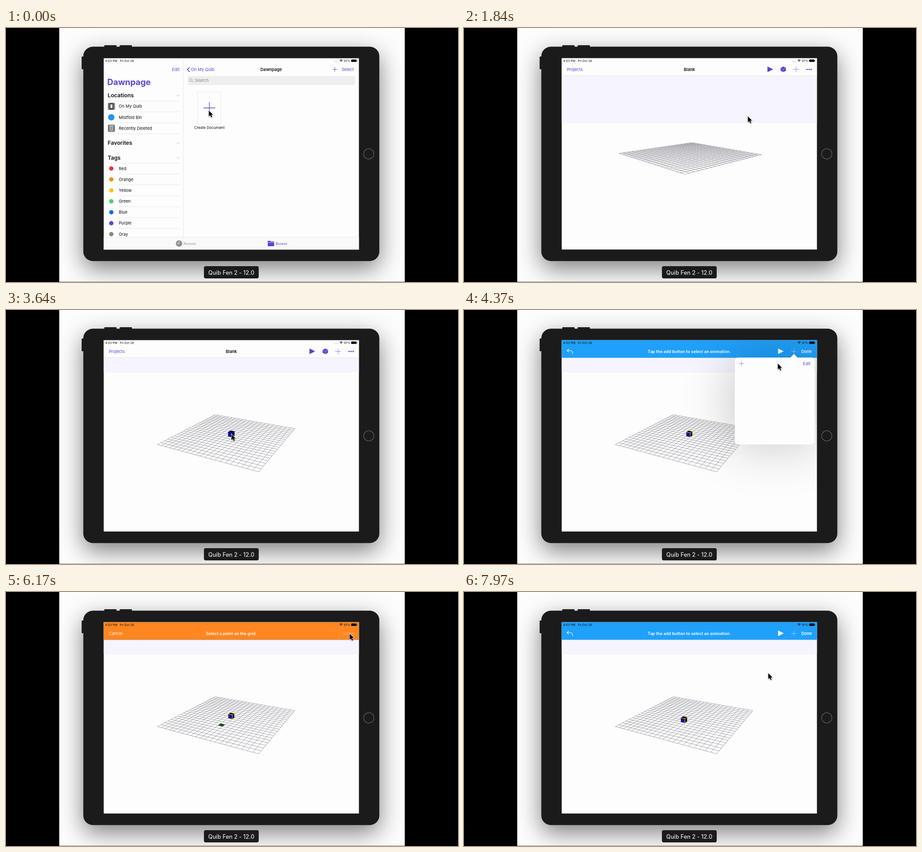
An HTML page with a canvas for the animation above (8000 ms loop, 998 by 561 pixels).

```html
<!DOCTYPE html>
<html lang="en">
<head>
<meta charset="utf-8">
<title>Tablet scene editor</title>
<style>
  html, body { margin: 0; width: 100%; height: 100%; overflow: hidden; background: #000; }
  canvas { display: block; }
</style>
</head>
<body>
<canvas id="stage" width="998" height="561"></canvas>
<script>
const ctx = document.getElementById('stage').getContext('2d');
const LOOP = 8000;
const PURPLE = '#5a45d2', WHITE = '#fdfdfd', BLUE = '#1fa0fa', ORANGE = '#ff8620';
const SCREEN = { x: 215.5, y: 66.5, w: 564, h: 423 };
const BAR_BOTTOM = 105.5;

// Each key: [time, values...], eased between neighbours.
const CURSOR = [
  [0, 447, 181], [650, 447, 181], [1500, 630, 193], [1840, 626, 194], [2400, 532, 209],
  [2560, 556, 206], [2960, 704, 92], [3080, 704, 92], [3520, 497, 273], [3760, 497, 273],
  [4100, 729, 92], [4200, 729, 92], [4370, 692, 117], [4530, 613, 118], [4950, 613, 118],
  [5500, 475, 293], [5680, 475, 293], [6120, 758, 91], [6450, 758, 91], [7000, 699, 92],
  [7500, 699, 92], [7970, 671, 178]
];
// Yaw and pitch in degrees.
const CAMERA = [[1680, 0, 10.5], [1840, -2.6, 11.8], [2400, 22.9, 23.4], [2560, 16.6, 23]];
// An odd number of cells, so that one cell is centred on the origin.
const GRID_HALF = 10.5;
const MOVE_TARGET = 4;

const clamp = v => Math.max(0, Math.min(1, v));
const smooth = v => v * v * (3 - 2 * v);
const ramp = (t, from, to) => smooth(clamp((t - from) / (to - from)));
const fadeInOut = (t, a, b, len = 120) => ramp(t, a, a + len) * (1 - ramp(t, b, b + len));

function track(keys, t) {
  let i = 0;
  while (i < keys.length - 2 && t >= keys[i + 1][0]) i++;
  const [a, b] = [keys[i], keys[i + 1]];
  const k = ramp(t, a[0], b[0]);
  return a.slice(1).map((v, n) => v + (b[n + 1] - v) * k);
}

function text(str, x, y, size, color = '#111', weight = 400, align = 'left') {
  ctx.font = `${weight} ${size}px Inter, "Liberation Sans", sans-serif`;
  ctx.textAlign = align;
  ctx.fillStyle = color;
  ctx.fillText(str, x, y + size * 0.36);
}
function rect(x, y, w, h, color, radius = 0) {
  ctx.fillStyle = color;
  ctx.beginPath();
  ctx.roundRect(x, y, w, h, radius);
  ctx.fill();
}
function circle(x, y, r, color) {
  ctx.fillStyle = color;
  ctx.beginPath();
  ctx.arc(x, y, r, 0, 7);
  ctx.fill();
}
function shape(points, fill, stroke, width = 1, closed = true) {
  ctx.beginPath();
  points.forEach(p => ctx.lineTo(...p));
  if (closed) ctx.closePath();
  if (fill) { ctx.fillStyle = fill; ctx.fill(); }
  if (stroke) { ctx.strokeStyle = stroke; ctx.lineWidth = width; ctx.stroke(); }
}
const line = (points, color, width) => shape(points, null, color, width, false);
function plus(x, y, r, color, width = 0.8) {
  line([[x - r, y], [x + r, y]], color, width);
  line([[x, y - r], [x, y + r]], color, width);
}
function withAlpha(alpha, draw) {
  if (alpha <= 0) return;
  ctx.save();
  ctx.globalAlpha *= alpha;
  draw();
  ctx.restore();
}

function drawDevice() {
  rect(0, 0, 998, 561, '#000');
  rect(117.5, 0, 763, 560, WHITE);
  rect(117.5, 560, 763, 1, '#8a8a80');
  ctx.save();
  ctx.beginPath();
  ctx.rect(117.5, 0, 763, 560);
  ctx.clip();
  rect(217, 38, 27, 6, '#24231f', 1);
  rect(251, 38, 27, 6, '#24231f', 1);
  rect(167, 63, 6, 28, '#24231f', 1);
  ctx.shadowColor = 'rgba(0,0,0,.5)';
  ctx.shadowBlur = 52;
  ctx.shadowOffsetY = 17;
  rect(170.7, 41.3, 653.6, 473.4, '#1b1b1b', 21);
  ctx.restore();
  ctx.strokeStyle = '#67635a';
  ctx.lineWidth = 1.2;
  ctx.beginPath();
  ctx.arc(801, 278, 11.3, 0, 7);
  ctx.stroke();
  rect(437, 526, 121, 27, '#1b1b1b', 4);
  text('Quib Fen 2 - 12.0', 497.5, 540, 12.6, '#e2e2e2', 500, 'center');
}

function drawStatus() {
  text('4:03 PM', 219, 72.3, 6.7);
  text('Fri Oct 26', 251.5, 72.3, 6.7);
  for (let i = 0; i < 4; i++) circle(725.5 + i * 2.4, 74, 0.6, '#777');
  ctx.strokeStyle = '#111';
  ctx.lineWidth = 1.1;
  for (const r of [1, 3, 5]) {
    ctx.beginPath();
    ctx.arc(740, 75, r, -2.3, -0.85);
    ctx.stroke();
  }
  text('97%', 746, 72.3, 6.7);
  rect(762, 69.5, 12, 5.6, '#111', 1.5);
  rect(774.6, 71.2, 1, 2.2, '#111');
}

function chevron(y) {
  line([[377, y - 1.5], [380.3, y + 1.7], [383.6, y - 1.5]], '#aaa', 0.8);
}
function drawBrowser() {
  rect(SCREEN.x, SCREEN.y, SCREEN.w, SCREEN.h, WHITE);
  drawStatus();
  text('Edit', 383, 92, 9.3, PURPLE, 400, 'right');
  text('Dawnpage', 223.5, 119, 18.4, PURPLE, 700);
  for (const [name, y] of [['Locations', 149], ['Favorites', 254], ['Tags', 286.5]]) {
    text(name, 224.5, y, 12.2, '#111', 600);
    chevron(y);
  }
  for (const y of [161.5, 298.5]) line([[224, y], [384, y]], '#dedee2', 0.7);

  ['On My Quib', 'Mistfold Bin', 'Recently Deleted'].forEach((name, i) => {
    const y = 173 + i * 24.2;
    if (i === 1) circle(232.5, y, 7, '#1e96f2');
    else rect(225, y - 8, 15.5, 16, '#77777b', 3);
    text(name, 249, y, 9.2);
    line([[i < 2 ? 249 : 224, y + 12.2], [384, y + 12.2]], '#dedee2', 0.7);
  });
  rect(229, 167, 7.5, 12, '#111', 1.5);
  rect(230.2, 168.5, 5.1, 8.7, '#eee');
  shape([[229.5, 217.5], [236, 217.5], [235.3, 227], [230.2, 227]], null, '#eee', 0.9);
  line([[228.5, 216], [237, 216]], '#eee', 0.9);
  for (const x of [231.6, 233.9]) line([[x, 219], [x, 225.5]], '#eee', 0.6);

  const tags = { Red: '#f5333a', Orange: '#f98b13', Yellow: '#fac70c', Green: '#47d45e',
                 Blue: '#0a6df5', Purple: '#5350cf', Gray: '#858587' };
  Object.entries(tags).forEach(([name, color], i) => {
    const y = 310.3 + i * 24.17;
    circle(232.5, y, 4.8, color);
    text(name, 249, y, 9.2);
    if (i < 6) line([[249, y + 12], [384, y + 12]], '#dedee2', 0.7);
  });

  line([[391.5, 67], [391.5, 462]], '#e2e2e6', 0.8);
  line([[405.5, 86.5], [400.3, 91.7], [405.5, 96.9]], PURPLE, 1.6);
  text('On My Quib', 408.5, 92, 9.2, PURPLE);
  text('Dawnpage', 585.5, 92, 9.2, '#111', 600, 'center');
  plus(726, 91.5, 5, PURPLE, 0.9);
  text('Select', 768, 92, 9.2, PURPLE, 400, 'right');
  rect(401, 106, 370, 20, '#eeeeef', 5);
  ctx.strokeStyle = '#88888d';
  ctx.lineWidth = 0.9;
  ctx.beginPath();
  ctx.arc(408.3, 115, 3, 0, 7);
  ctx.stroke();
  line([[410.4, 117.2], [412.8, 119.6]], '#88888d', 1);
  text('Search', 417, 115.8, 9.2, '#88888d');

  rect(422.5, 141, 52.5, 71, '#d8d8d4');
  rect(423, 141.5, 51.5, 70, WHITE);
  plus(449, 176.5, 13, PURPLE, 1.3);
  text('Create Document', 449, 220.5, 8.1, '#111', 400, 'center');

  rect(SCREEN.x, 462, SCREEN.w, 28, '#f9f9fb');
  line([[SCREEN.x, 462], [SCREEN.x + SCREEN.w, 462]], '#e2e2e4', 0.7);
  circle(382, 476, 7, '#8f8f93');
  line([[382, 471], [382, 476.5], [378.5, 476.5]], WHITE, 1);
  text('Recents', 392, 476, 7.2, '#8f8f93');
  rect(578, 470, 6, 4, PURPLE, 1);
  rect(578, 471.5, 14, 10.5, PURPLE, 1);
  line([[578, 473.8], [592, 473.8]], WHITE, 0.7);
  text('Browse', 595.5, 476, 7.2, PURPLE);
}

// Orbit camera looking at the grid centre; one grid cell is one unit.
function makeProjector(yaw, pitch) {
  const s = Math.sin(yaw) * Math.SQRT1_2, c = Math.cos(yaw) * Math.SQRT1_2;
  const distance = 51.1, focal = 542;
  return (a, b, h = 0) => {
    const x = a * (s - c) + b * (s + c);
    const near = a * (c + s) + b * (c - s);
    const k = focal / (distance - near * Math.cos(pitch) - h * Math.sin(pitch));
    return [497.5 + x * k, 278.2 + (near * Math.sin(pitch) - h * Math.cos(pitch)) * k];
  };
}

function drawCube(project, at, selected) {
  const n = 0.48, top = 2 * n;
  const [lo, hi] = [at - n, at + n];
  const [lid, side, front] = selected ? ['#04041c', '#02020c', '#0808b4']
                                      : ['#050558', '#03034a', '#06069a'];
  const faces = [
    [lid, [[lo, -n, top], [lo, n, top], [hi, n, top], [hi, -n, top]]],
    [side, [[hi, n, 0], [lo, n, 0], [lo, n, top], [hi, n, top]]],
    [front, [[hi, -n, 0], [hi, n, 0], [hi, n, top], [hi, -n, top]]]
  ];
  for (const [color, corners] of faces)
    shape(corners.map(p => project(...p)), color, selected ? '#f0cf3c' : color, selected ? 0.9 : 0.4);
}

function drawScene(t) {
  const [yaw, pitch] = track(CAMERA, t).map(v => v * Math.PI / 180);
  const project = makeProjector(yaw, pitch);
  rect(SCREEN.x, SCREEN.y, SCREEN.w, SCREEN.h, WHITE);
  const horizon = 280 - 335 * Math.tan(pitch);
  rect(SCREEN.x, 105, SCREEN.w, horizon - 105, '#f5f4ff');
  for (let i = -GRID_HALF; i <= GRID_HALF; i++) {
    line([project(i, -GRID_HALF), project(i, GRID_HALF)], 'rgba(55,55,75,.75)', 0.58);
    line([project(-GRID_HALF, i), project(GRID_HALF, i)], 'rgba(55,55,75,.75)', 0.58);
  }
  if (t >= 5580 && t < 6300) {
    const [lo, hi] = [MOVE_TARGET - 0.5, MOVE_TARGET + 0.5];
    shape([project(lo, -0.5), project(lo, 0.5), project(hi, 0.5), project(hi, -0.5)], '#07500f');
  }
  if (t >= 3050) drawCube(project, MOVE_TARGET * ramp(t, 7430, 8430), t >= 3730);
}

function cubeIcon(x, y) {
  shape([[x, y - 6.3], [x + 5.9, y - 3.3], [x + 5.9, y + 3.2], [x, y + 6.3],
         [x - 5.9, y + 3.2], [x - 5.9, y - 3.3]], PURPLE);
  line([[x - 5.6, y - 3], [x, y - 0.2], [x + 5.6, y - 3]], '#b9b0f0', 0.7);
  line([[x, y - 0.2], [x, y + 6]], '#b9b0f0', 0.7);
}
const playIcon = (x, color) => shape([[x, 85], [x + 12.5, 91.2], [x, 97.4]], color);
const barFill = color => rect(SCREEN.x, SCREEN.y, SCREEN.w, BAR_BOTTOM - SCREEN.y, color);

function drawPlainBar() {
  barFill(WHITE);
  line([[SCREEN.x, 105.4], [SCREEN.x + SCREEN.w, 105.4]], '#dddde2', 0.7);
  text('Projects', 227, 92, 9.2, PURPLE);
  text('Blank', 497.5, 92, 9.2, '#111', 600, 'center');
  playIcon(670, PURPLE);
  cubeIcon(705, 91.3);
  plus(733.3, 91.5, 6.2, PURPLE, 0.6);
  for (const x of [757.5, 762, 766.5]) circle(x, 91.5, 1.6, PURPLE);
}
function drawBlueBar() {
  barFill(BLUE);
  line([[231.5, 86], [227.6, 89.7], [231.5, 93.4]], WHITE, 1.1);
  ctx.beginPath();
  ctx.moveTo(227.6, 89.7);
  ctx.lineTo(235.5, 89.7);
  ctx.quadraticCurveTo(240, 90, 240, 97.5);
  ctx.stroke();
  text('Tap the add button to select an animation.', 497.5, 92, 9.1, WHITE, 600, 'center');
  playIcon(693.5, WHITE);
  plus(728.5, 91.5, 6, 'rgba(255,255,255,.8)', 0.6);
  text('Done', 768, 92, 9.2, WHITE, 600, 'right');
}
function drawOrangeBar(t) {
  barFill(ORANGE);
  text('Cancel', 227, 92, 9.2, WHITE);
  text('Select a point on the grid.', 497.5, 92, 9.1, WHITE, 600, 'center');
  const pressed = ramp(t, 6110, 6160);
  text('Done', 768, 92, 9.2, `rgba(255,255,255,${1 - 0.75 * pressed})`, 600, 'right');
}

function drawPopover() {
  ctx.save();
  ctx.shadowColor = 'rgba(0,0,0,.24)';
  ctx.shadowBlur = 115;
  rect(598, 105, 176, 192, WHITE, 7);
  ctx.restore();
  shape([[720.5, 105.5], [727, 98.4], [728.5, 97.6], [730, 98.4], [736.5, 105.5]], WHITE);
  plus(612.5, 118.5, 6, PURPLE, 0.6);
  text('Edit', 765, 119, 9.2, PURPLE, 400, 'right');
}

function drawEditor(t) {
  drawScene(t);
  drawPlainBar();
  withAlpha(ramp(t, 3730, 3850), drawBlueBar);
  withAlpha(fadeInOut(t, 5080, 6260), () => drawOrangeBar(t));
  drawStatus();
  withAlpha(fadeInOut(t, 4180, 4960), drawPopover);
}

function drawCursor([x, y]) {
  const outline = [[0, 0], [0, 13], [3, 10.2], [5.2, 15], [7.4, 14], [5.3, 9.3], [9.3, 9.3]];
  ctx.save();
  ctx.translate(x + 0.8, y + 1.2);
  ctx.shadowColor = 'rgba(0,0,0,.3)';
  ctx.shadowBlur = 2;
  ctx.shadowOffsetY = 1;
  shape(outline, '#000', '#fff', 1.6);
  ctx.shadowColor = 'transparent';
  shape(outline, '#000');
  ctx.restore();
}

function drawScreen(t) {
  ctx.save();
  ctx.beginPath();
  ctx.rect(SCREEN.x, SCREEN.y, SCREEN.w, SCREEN.h);
  ctx.clip();
  const open = ramp(t, 450, 900);
  if (open < 1) drawBrowser();
  // The new document grows out of its thumbnail.
  withAlpha(clamp(open * 2), () => {
    const mix = (a, b) => a + (b - a) * open;
    ctx.translate(mix(422.5, SCREEN.x), mix(141, SCREEN.y));
    ctx.scale(mix(52.5 / SCREEN.w, 1), mix(71 / SCREEN.h, 1));
    ctx.translate(-SCREEN.x, -SCREEN.y);
    drawEditor(t);
  });
  ctx.restore();
}

function frame() {
  const t = performance.now() % LOOP;
  drawDevice();
  drawScreen(t);
  drawCursor(track(CURSOR, t));
  requestAnimationFrame(frame);
}
frame();
</script>
</body>
</html>
```
